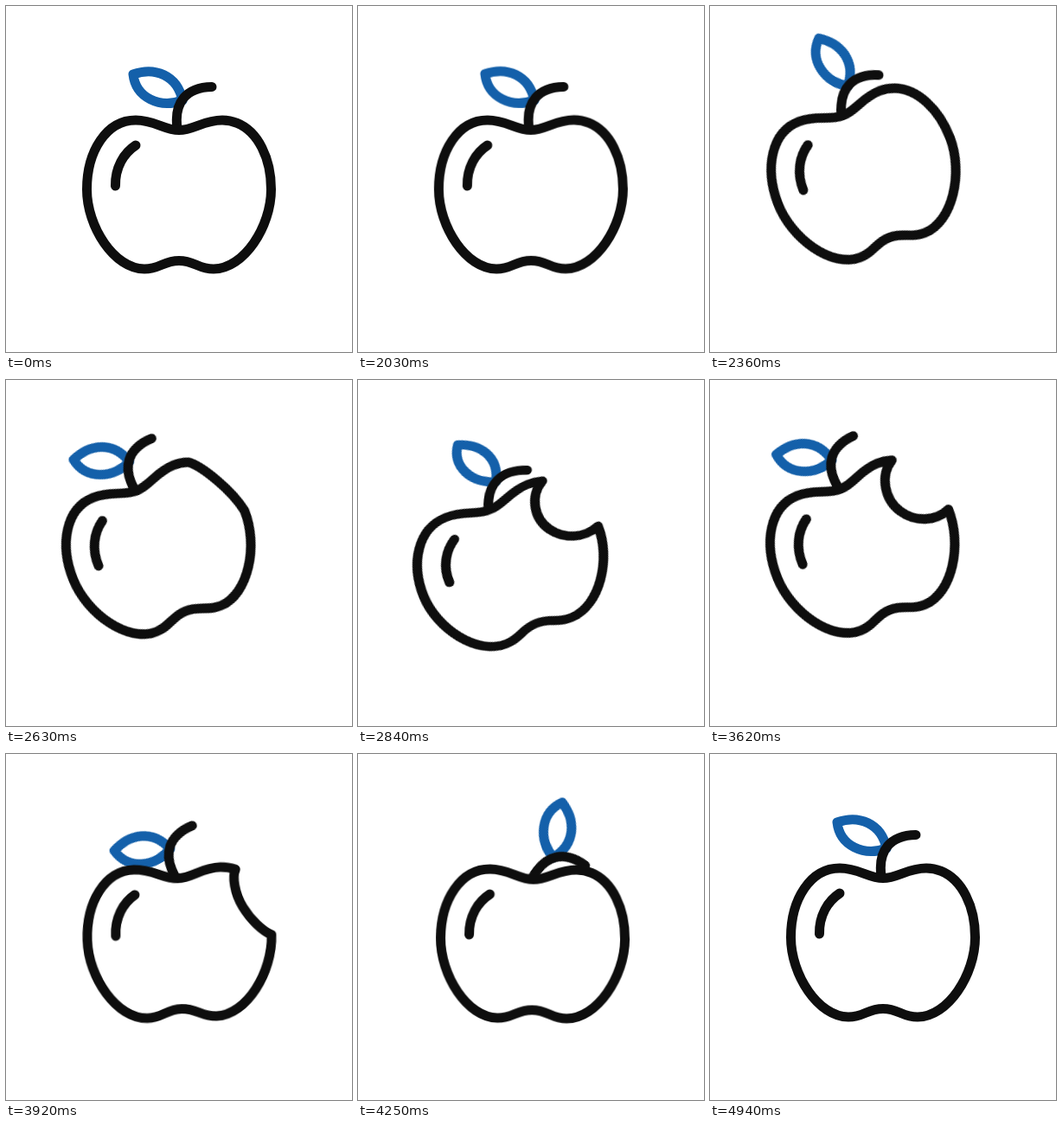
Write an HTML page that moves like this. It is 400 px wide and 400 px high and loops after 5.03 s.

```html
<!DOCTYPE html>
<html lang="en">
<head>
<meta charset="utf-8">
<title>Apple</title>
<style>
  html, body { margin: 0; width: 100%; height: 100%; overflow: hidden; background: #fff; }
  svg { display: block; width: 100%; height: 100%; }
  path { fill: none; stroke: #0e0e0e; stroke-width: 11; stroke-linecap: round; stroke-linejoin: round; }
  .leaf { stroke: #1460aa; }

  .apple, .sprig, .leaf, .skin { animation: 5030ms ease-in-out infinite; }
  .apple { transform-origin: 200px 217px; animation-name: hop; }
  .sprig { transform-origin: 199px 143px; animation-name: sway; }
  .leaf { transform-origin: 204px 107px; animation-name: flutter; }
  .skin { animation-name: bite; }

  /* hop to the upper left, squash under the bite, fall back with overshoot */
  @keyframes hop {
    0%, 39.9%, 86.5%, 100% { transform: translate(0, 0) rotate(0deg) scale(1, 1); }
    48.3%, 51.3%, 61.2%, 72.4% { transform: translate(-21.3px, -23px) rotate(-22deg) scale(1, 1); }
    56.3% { transform: translate(-21.5px, -3px) rotate(-22deg) scale(1.02, .94); }
    80.9% { transform: translate(8px, 8px) rotate(5deg) scale(1, 1); }
    84.5% { transform: translate(2px, 1.5px) rotate(.5deg) scale(1, 1); }
  }

  @keyframes sway {
    0%, 39.9%, 98.2%, 100% { transform: rotate(0deg); }
    47.1% { transform: rotate(25deg); }
    51% { transform: rotate(-3deg); }
    56.5% { transform: rotate(26deg); }
    61.5% { transform: rotate(-5deg); }
    66.5% { transform: rotate(4deg); }
    72% { transform: rotate(-2deg); }
    78% { transform: rotate(-20deg); }
    84.5% { transform: rotate(37deg); }
    89.5% { transform: rotate(-12deg); }
    93.6% { transform: rotate(2.5deg); }
  }

  @keyframes flutter {
    0%, 39.9%, 98.2%, 100% { transform: rotate(0deg); }
    47.1% { transform: rotate(27deg); }
    51.5% { transform: rotate(-5deg); }
    56.5% { transform: rotate(14deg); }
    62% { transform: rotate(-5deg); }
    67% { transform: rotate(3deg); }
    72% { transform: rotate(2deg); }
    78.5% { transform: rotate(-8deg); }
    84.5% { transform: rotate(34deg); }
    90% { transform: rotate(-12deg); }
    94% { transform: rotate(2deg); }
  }

  /* only the upper right of the outline changes */
  @keyframes bite {
    0%, 51.7%, 81%, 100% {
      d: path("M200 143.5 C217 143.5 228 132 250 132 C256 132 262 133.2 267.2 135.4 C279.3 140.3 289.1 150.4 295.9 163.9 C302.7 177.3 306.5 194 306.5 212 C306.5 255 275 304 240 304 C222 304 218 294.5 200 294.5 C182 294.5 178 304 160 304 C125 304 93.5 255 93.5 212 C93.5 168 116 132 150 132 C172 132 183 143.5 200 143.5 Z");
    }
    54.1%, 75% {
      d: path("M200 143.5 C217 143.5 228 132 250 132 C256 132 262 133.2 267.2 135 C248 146 242 173.4 254 193 C265 211 287 220 306.5 212 C306.5 255 275 304 240 304 C222 304 218 294.5 200 294.5 C182 294.5 178 304 160 304 C125 304 93.5 255 93.5 212 C93.5 168 116 132 150 132 C172 132 183 143.5 200 143.5 Z");
    }
  }
</style>
</head>
<body>
<svg viewBox="0 0 400 400">
  <g class="apple">
    <g class="sprig">
      <path class="leaf" d="M147 79 C172 70 198 80 204 109 C178 119 150 106 147 79 Z"/>
      <path d="M198 141 C194 112 208 94 238 93.5"/>
    </g>
    <path class="skin" d="M200 143.5 C217 143.5 228 132 250 132 C256 132 262 133.2 267.2 135.4 C279.3 140.3 289.1 150.4 295.9 163.9 C302.7 177.3 306.5 194 306.5 212 C306.5 255 275 304 240 304 C222 304 218 294.5 200 294.5 C182 294.5 178 304 160 304 C125 304 93.5 255 93.5 212 C93.5 168 116 132 150 132 C172 132 183 143.5 200 143.5 Z"/>
    <path d="M150 161 C136 170 126 187 126.5 208"/>
  </g>
</svg>
</body>
</html>
```
